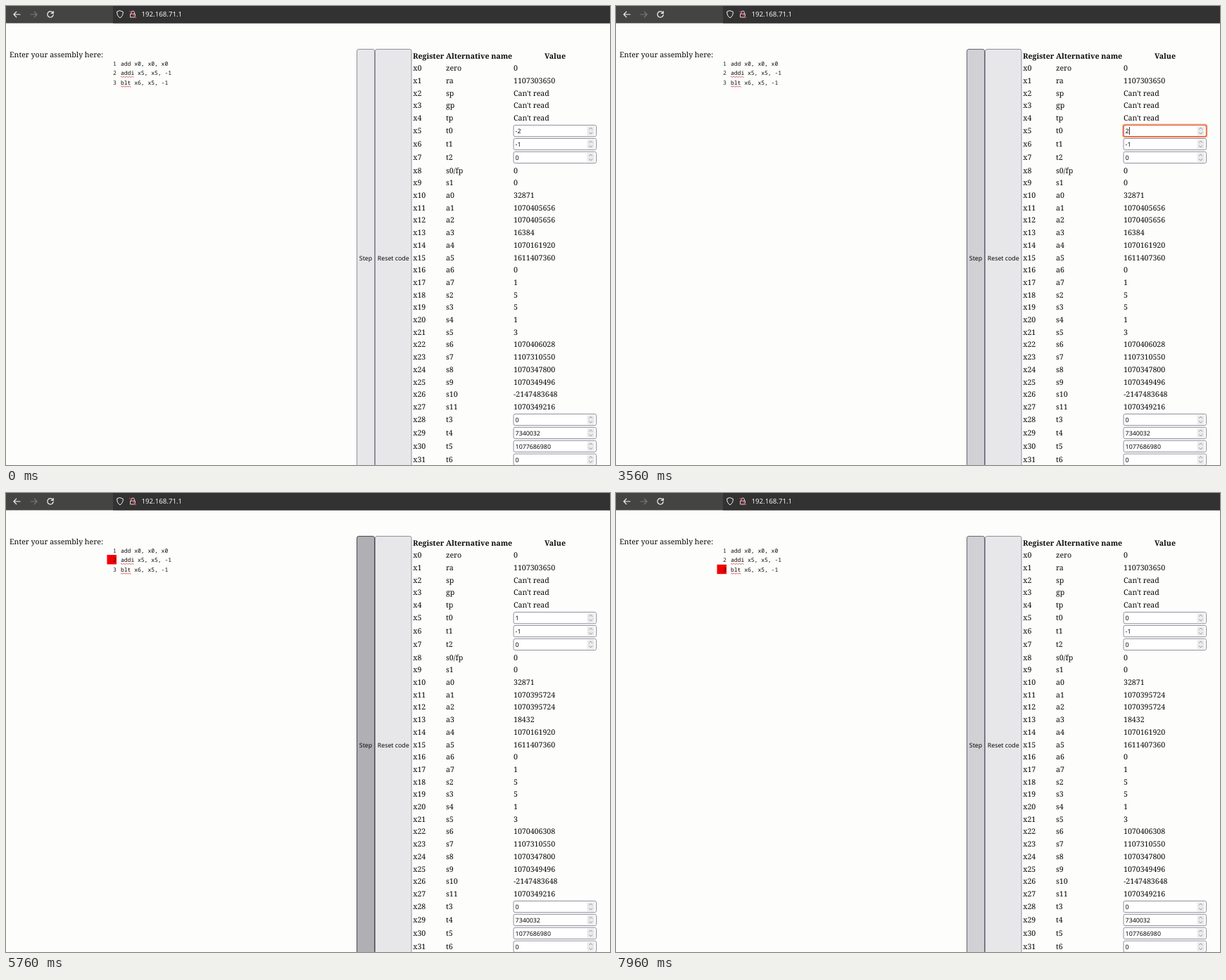
An HTML page for the animation above (8 s loop, 858 by 653 pixels).

```html
<!DOCTYPE html>
<html lang="en">
<head>
<meta charset="utf-8">
<title>Assembly stepper</title>
<style>
  html, body { margin: 0; width: 100%; height: 100%; overflow: hidden; background: #fdfdfc; }
  svg { display: block; width: 858px; height: 653px; }
  text { text-rendering: geometricPrecision; white-space: pre; }
  .serif { font: 10.6px "Noto Serif", serif; }
  .bold { font-weight: bold; }
  .ui { font: 8.8px "Noto Sans", sans-serif; }
  .url { font: 9.7px "Noto Sans", sans-serif; }
  .mono { font: 8px "Noto Sans Mono", monospace; }
  .line { fill: none; stroke-linecap: round; stroke-linejoin: round; }
</style>
</head>
<body>
<svg id="stage" viewBox="0 0 858 653"></svg>
<script>
const LOOP = 8000;
const stage = document.getElementById('stage');

function add(tag, attrs, text) {
  const el = document.createElementNS('http://www.w3.org/2000/svg', tag);
  for (const k in attrs) el.setAttribute(k, attrs[k]);
  if (text !== undefined) el.textContent = text;
  return stage.appendChild(el);
}
const rect = (x, y, width, height, fill, more) => add('rect', { x, y, width, height, fill, ...more });
const label = (x, y, text, cls, fill = '#0a0a0a', anchor = 'start') =>
  add('text', { x, y, class: cls, fill, 'text-anchor': anchor }, text);
const line = (d, stroke, width = 1) => add('path', { d, stroke, 'stroke-width': width, class: 'line' });
const show = (el, on) => el.setAttribute('visibility', on ? 'visible' : 'hidden');
const setText = (el, s) => { if (el.textContent !== s) el.textContent = s; };

// Browser toolbar
function drawToolbar() {
  const light = '#f4f4f4';
  rect(0, 0, 858, 24.5, '#444443');
  rect(152, 0, 706, 24.5, '#333232');
  line('M20 12H11M14.8 8.2L11 12L14.8 15.8', light, 1.2);
  line('M35 12H44M40.2 8.2L44 12L40.2 15.8', '#7b7b7b', 1.2);
  line('M66.3 9.2A4.2 4.2 0 1 0 67.2 12.4M67.2 7.6V10.4H64.3', light, 1.2);
  line('M162 6.7L166.3 8.3C166.4 12.5 165 15.2 162 16.8C159 15.2 157.6 12.5 157.7 8.3Z', light);
  line('M178 11V9.3A2.2 2.2 0 0 1 182.4 9.3V11M177 11.2H183.4V16H177Z', '#dcdcdc');
  line('M176 7.5L184.5 16.5', '#e0405a', 1.2);
  label(192.5, 15, '192.168.71.1', 'url', '#f2f2f2');
}

// Code editor
const LINE_H = 13.75;
const code = ['add x0, x0, x0', 'addi x5, x5, -1', 'blt x6, x5, -1'];
let marker, lineNos;

function drawEditor() {
  label(5, 72.8, 'Enter your assembly here:', 'serif');
  marker = rect(143.5, 74.3, 13.5, 13.4, '#f00000');
  lineNos = code.map((src, i) => {
    const y = 84.5 + i * LINE_H;
    label(163, y, src, 'mono');
    const word = src.split(' ')[0];
    if (word !== 'add') {
      let d = `M163.3 ${y + 2}`;
      for (let k = 1; k < word.length * 2.4; k++) d += `l2 ${k % 2 ? 1.2 : -1.2}`;
      line(d, '#e03a3a', 0.8);
    }
    return label(156.8, y, i + 1, 'mono', '#222', 'end');
  });
}

// Buttons
const face = {
  idle: ['#e7e7e9', '#8f8f9d'],
  hover: ['#d0d0d5', '#676774'],
  down: ['#b0b0b4', '#484851']
};
let stepBtn, resetBtn;

function button(x, w, text) {
  const box = rect(x + 0.5, 61.5, w - 1, 594, '', { rx: 2.6 });
  label(x + w / 2, 361.8, text, 'ui', '#0a0a0a', 'middle');
  return box;
}
function paint(btn, mode) {
  btn.setAttribute('fill', face[mode][0]);
  btn.setAttribute('stroke', face[mode][1]);
}

// Register table
const altNames = ('zero ra sp gp tp t0 t1 t2 s0/fp s1 a0 a1 a2 a3 a4 a5 a6 a7 ' +
  's2 s3 s4 s5 s6 s7 s8 s9 s10 s11 t3 t4 t5 t6').split(' ');
const NO = "Can't read";
const startValues = [0, 1107303650, NO, NO, NO, -2, -1, 0, 0, 0, 32871, 1070405656, 1070405656,
  16384, 1070161920, 1611407360, 0, 1, 5, 5, 1, 3, 1070406028, 1107310550, 1070347800,
  1070349496, -2147483648, 1070349216, 0, 7340032, 1077686980, 0];
const snapshots = [
  {},
  { 11: 1070411528, 12: 1070411528, 17: 0, 18: 0, 19: 0, 20: 0, 22: 1070348512 },
  { 11: 1070395724, 12: 1070395724, 13: 18432, 22: 1070406308 }
];
const cells = [];
let t0Box, ring, caret;

function numberInput(mid, value) {
  const box = rect(721, mid - 8.1, 117.5, 16.2, '#fff', { rx: 2.2, stroke: '#8f8f9d' });
  rect(825.5, mid - 6.6, 10.5, 13.2, '#ebebed', { rx: 1 });
  line(`M828.4 ${mid - 2.2}l2.2 -2.2l2.2 2.2M828.4 ${mid + 2.2}l2.2 2.2l2.2 -2.2`, '#85858c', 0.9);
  return [label(723.6, mid + 3.3, value, 'ui'), box];
}

function drawTable() {
  label(578, 74.8, 'Register', 'serif bold');
  label(625, 74.8, 'Alternative name', 'serif bold');
  label(780, 74.8, 'Value', 'serif bold', '#0a0a0a', 'middle');
  let top = 79.65;
  altNames.forEach((name, i) => {
    const editable = name[0] === 't' && name !== 'tp';
    const h = editable ? 18.9 : 17.71;
    const mid = top + h / 2;
    label(578.3, mid + 3.8, 'x' + i, 'serif');
    label(625, mid + 3.8, name, 'serif');
    if (editable) {
      const [text, box] = numberInput(mid, startValues[i]);
      cells.push(text);
      if (i === 5) t0Box = box;
    } else {
      cells.push(label(721, mid + 3.8, startValues[i], 'serif'));
    }
    top += h;
  });
  ring = add('g', {});
  ring.append(
    rect(719.8, 168.4, 119.9, 18.4, 'none', { rx: 3.2, stroke: '#f5b49c', 'stroke-width': 1.6 }),
    rect(721, 169.5, 117.5, 16.2, 'none', { rx: 2.2, stroke: '#dd5628', 'stroke-width': 1.2 })
  );
  caret = rect(0, 172.2, 0.9, 10.8, '#111');
}

// Timelines: [start ms, value]
const tracks = {
  step: [[0, 'idle'], [3560, 'hover'], [3730, 'down'], [4070, 'hover'], [4910, 'down'],
    [5420, 'hover'], [5760, 'down'], [5930, 'hover'], [6270, 'down'], [6440, 'hover'],
    [6940, 'down'], [7280, 'hover'], [7790, 'down'], [7960, 'hover']],
  reset: [[0, 'idle'], [3390, 'hover'], [3560, 'idle']],
  over: [[0, false], [680, true], [3390, false]],
  focus: [[0, false], [1020, true], [3730, false]],
  caret: [[0, false], [1020, true], [2540, false], [2880, true], [3730, false]],
  t0: [[0, '-2'], [1520, '-'], [1860, ''], [2880, '2'], [5590, '1'], [6610, '0']],
  line: [[0, 0], [4230, 1], [5590, 2], [6100, 3], [6610, 2], [7450, 3]],
  regs: [[0, 0], [4230, 1], [5590, 2]]
};
function at(name, t) {
  let value;
  for (const [start, v] of tracks[name]) if (t >= start) value = v;
  return value;
}

function render(t) {
  paint(stepBtn, at('step', t));
  paint(resetBtn, at('reset', t));

  const current = at('line', t);
  show(marker, current > 0);
  marker.setAttribute('y', 74.3 + (current - 1) * LINE_H);
  lineNos.forEach((el, i) => el.setAttribute('fill', i + 1 === current ? '#500000' : '#222'));

  const changed = snapshots[at('regs', t)];
  cells.forEach((el, i) => setText(el, i === 5 ? at('t0', t) : String(changed[i] ?? startValues[i])));

  t0Box.setAttribute('stroke', at('over', t) ? '#676774' : '#8f8f9d');
  show(ring, at('focus', t));
  show(caret, at('caret', t));
  const typed = cells[5].textContent ? cells[5].getComputedTextLength() : 0;
  caret.setAttribute('x', 723.9 + typed);
}

rect(0, 0, 858, 653, '#fdfdfc');
drawToolbar();
drawEditor();
stepBtn = button(498, 26, 'Step');
resetBtn = button(524, 52.5, 'Reset code');
drawTable();

function tick() {
  render(performance.now() % LOOP);
  requestAnimationFrame(tick);
}
tick();
</script>
</body>
</html>
```
